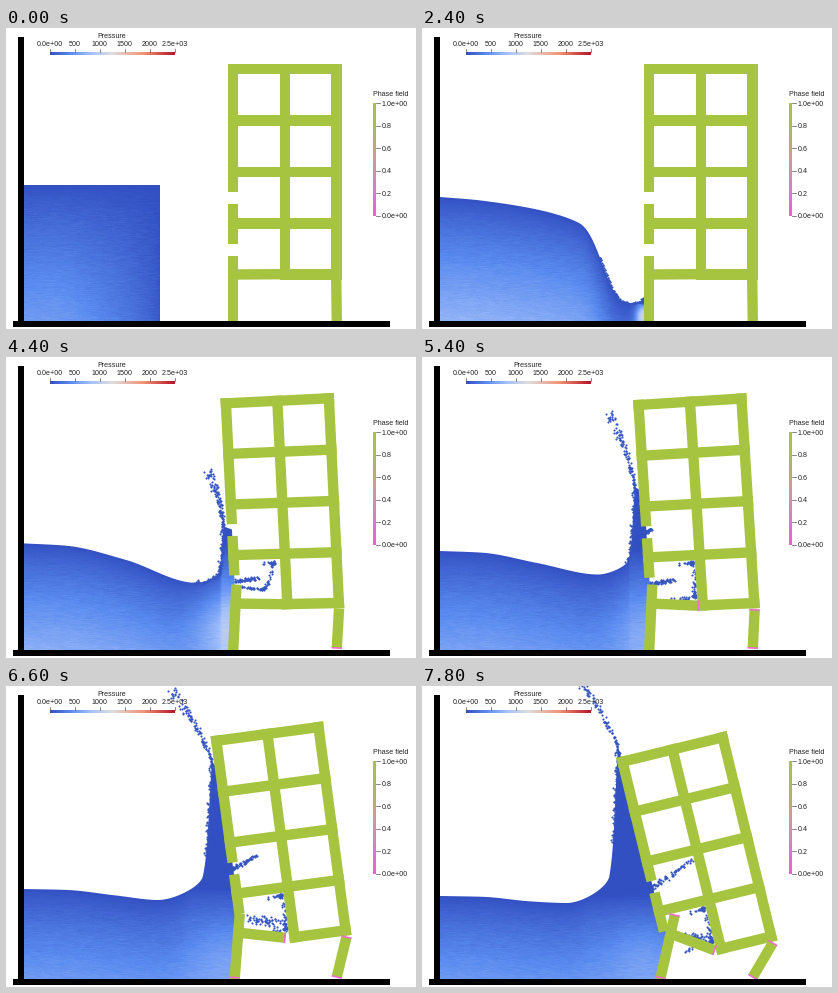
These frames come from a looping animation (410x301 px, 8000 ms). A matplotlib script:

```python
import numpy as np
import matplotlib.pyplot as plt
from matplotlib.animation import FuncAnimation
from matplotlib.collections import LineCollection, PolyCollection
from matplotlib.colors import LinearSegmentedColormap
from matplotlib.patches import Polygon, Rectangle

W, H, DPI = 410, 301, 64
STEP, FRAMES = 200, 40
PX = 72 / DPI
GREEN, PINK, DEEP = "#a6c43f", "#f06ad2", "#3454c0"
HIT = 2400  # the wave reaches the building

pressure_map = LinearSegmentedColormap.from_list("pressure", [
    (0, "#3350c2"), (0.16, "#5a8bef"), (0.33, "#a6c2fa"),
    (0.5, "#dddddd"), (0.75, "#f29476"), (1, "#b81428")])
phase_map = LinearSegmentedColormap.from_list("phase", [
    (0, "#f25be0"), (0.5, "#cb9a9c"), (0.8, "#a9bd4d"), (1, GREEN)])
rng = np.random.default_rng(4)


def ease(a, b, t):
    u = np.clip((t - a) / (b - a), 0, 1)
    return u * u * (3 - 2 * u)


def pchip(t, v, x, start_flat=True):
    """Monotone cubic through the rows of v at positions t."""
    t, v = np.asarray(t, float), np.asarray(v, float)
    x = np.atleast_1d(x)
    h = np.diff(t)[:, None]
    d = np.diff(v, axis=0) / h
    m = np.zeros_like(v)
    same = d[:-1] * d[1:] > 0
    m[1:-1] = np.where(same, 2 * d[:-1] * d[1:] / np.where(same, d[:-1] + d[1:], 1), 0)
    m[-1] = d[-1]
    if not start_flat:
        m[0] = d[0]
    i = np.clip(np.searchsorted(t, x, "right") - 1, 0, len(t) - 2)
    h = h[i]
    u = np.clip((x - t[i])[:, None] / h, 0, 1)
    return ((2 * u**3 - 3 * u**2 + 1) * v[i] + (u**3 - 2 * u**2 + u) * h * m[i]
            + (3 * u**2 - 2 * u**3) * v[i + 1] + (u**3 - u**2) * h * m[i + 1])


def smooth(pts, n=120):
    gaps = np.hypot(*np.diff(pts, axis=0).T) + 1e-3
    s = np.concatenate([[0], np.cumsum(gaps)])
    return pchip(s, pts, np.linspace(0, s[-1], n), start_flat=False)


# ---- building ---------------------------------------------------------
CORNER = np.array([335.5, 36])
THICK = 10.4
# time: top right corner x, y, tilt, flex of lower floors, left leg angle
POSE = {0: (335.5, 36, 0, .7, 0), HIT: (335.5, 36, 0, .7, 0),
        3600: (330.4, 35.8, 2.2, .7, 3), 5400: (324.3, 36, 3.6, .3, 2.7),
        6600: (317, 35.3, 7.6, 0, 4.5), 7800: (304.5, 45, 13.7, 0, 12.7)}

LEVELS = 36 + 51.4 * np.arange(4)
BOXES = [(222, y, 335.5, y + THICK) for y in LEVELS]
BOXES += [(273.5, 241, 335.5, 251.5), (273.5, 36, 283.9, 251.5),
          (325.1, 36, 335.5, 251.5), (222, 36, 232.4, 164), (222, 176, 232.4, 216)]


def pose(t):
    return pchip(list(POSE), list(POSE.values()), t)[0]


def carry(t, pts):
    """Move points of the standing building to where they are at time t."""
    cx, cy, deg, flex, _ = pose(t)
    c, s = np.cos(np.radians(deg)), np.sin(np.radians(deg))
    x, y = (np.asarray(pts, float) - CORNER).T
    sink = -x * s * (1 - flex * np.clip(y / 215, 0, 1))
    return np.c_[cx + x * c + y * s, cy + sink + y * c]


def left_leg(t):
    foot = np.array([227.2 + 11 * np.clip((t - 5400) / 2400, 0, 1) ** 3, 293.5])
    a = np.radians(pose(t)[4])
    up = np.array([np.sin(a), -np.cos(a)])
    return foot, foot + 47 * up, foot + 66 * up


def bar(a, b):
    d = (b - a) / np.hypot(*(b - a))
    n = np.array([-d[1], d[0]]) * THICK / 2
    return np.array([a + n, b + n, b - n, a - n])


def building(t):
    polys = [carry(t, [(x0, y0), (x1, y0), (x1, y1), (x0, y1)])
             for x0, y0, x1, y1 in BOXES]
    foot, knee, head = left_leg(t)
    aim = carry(t, [(272, 246.2)])[0] - knee
    far = knee + aim / np.hypot(*aim) * (51 - 4 * ease(3600, 5400, t))
    top = carry(t, [(330.2, 251 + 2 * ease(3600, 5400, t))])[0]
    base = np.array([330.8, 294 - 3 * ease(2800, 3600, t)])
    left, slab, right = bar(foot, head), bar(knee, far), bar(top, base)
    cracks = [(3400, right[1:3]), (4600, right[[0, 3]]), (4600, slab[1:3]),
              (6000, left[[0, 3]] - (0, 2)), (7000, left[1:3])]
    return polys + [left, slab, right], [seg for begin, seg in cracks if t >= begin]


# ---- water body -------------------------------------------------------
# time: height at the wall, shoulder, trough, tip
WAVE = {0: (157, 154, 157, 154, 250, 154, 293),
        1600: (163, 153, 174, 168, 257, 193, 292),
        HIT: (169, 157, 195, 206, 275, 222, 271),
        3600: (180, 125, 200, 198, 237, 220, 203),
        5400: (194, 115, 206, 176, 217.5, 213, 130),
        6600: (203, 110, 209.5, 152, 214, 206, 75),
        7800: (210, 110, 215.5, 145, 217, 196, 60)}


def surface(t):
    y, *rest = pchip(list(WAVE), list(WAVE.values()), t)[0]
    shoulder, trough, tip = np.reshape(rest, (3, 2))
    a = np.interp(t, [1600, HIT], [.4, .83])
    bend = trough + (tip - trough) * (a, 1 - a)
    start = (18, y), (60, y + .14 * (shoulder[1] - y))
    return smooth(np.vstack([*start, shoulder, trough, bend, tip]))


def outline(t, line):
    """Close the surface along the floor, or behind the wall it leans on."""
    tip = line[-1]
    if tip[0] < 221:
        back = [(tip[0], 294)]
    else:
        back = []
    if t >= HIT:
        foot, knee, _ = left_leg(t)
        wall = carry(t, [(227, max(tip[1], 36)), (227, 214)])
        back = [p for p in wall if p[1] >= tip[1] - 2] + [knee, foot]
    return np.vstack([line, *back, (18, 294)])


gx, gy = np.meshgrid(np.arange(18, 250) + .5, np.arange(0, 294) + .5)
grain = rng.normal(0, 1, gx.shape)
grain = sum(np.roll(grain, k, axis=1) for k in range(7)) / 7 * .02


def pressure(t, line):
    x = np.maximum.accumulate(line[:, 0] + np.arange(len(line)) * 1e-4)
    top = np.interp(gx[0], x, np.maximum(line[:, 1], line[0, 1]))
    depth = np.clip(gy - top, 0, None)
    strength = .2 + .1 * np.exp(-((t - 3200) / 2000) ** 2)
    p = strength * (depth / (293 - line[0, 1])) ** .8
    # the free face of the collapsing column carries no pressure
    free = np.clip(1 - t / HIT, 0, 1)
    p *= 1 - free + free * np.clip((line[-1, 0] + 2 - gx) / 100, 0, 1) ** .6
    grow = ease(HIT, 3600, t)
    hit = np.interp(t, [2200, HIT, 3600, 5200], [0, .4, .26, .06])
    p += hit * np.exp(-((gx - 221) / (7 + 25 * grow)) ** 2
                      - ((gy - 288 + 20 * grow) / (12 + 26 * grow)) ** 2)
    return p + grain * np.clip(depth / 30, 0, 1)


# ---- spray ------------------------------------------------------------
def swarm(n):
    return np.sort(rng.random(n))[:, None], np.clip(rng.normal(0, 1, (n, 2)), -1.8, 1.8)


crown, lining, film, pool, jet = (swarm(n) for n in (110, 90, 95, 60, 75))
ROOM = smooth(np.array([(255, 204), (271, 203), (271, 236), (242, 240)]))


def along(path, s):
    return path[(s[:, 0] * (len(path) - 1)).astype(int)]


def droplets(t, line):
    if t < HIT:
        return np.empty((0, 2))
    tip = line[-1]
    # crown flung up and back from the wall
    q = (t - HIT) / 5400
    end = np.array([220 - 80 * q**1.5, 272 - 500 * q + 200 * q * q])
    ctrl = (tip + end) / 2 + (4, -6 * q)
    s, off = crown
    s = s ** 1.3
    parts = [(1 - s)**2 * tip + 2 * s * (1 - s) * ctrl + s * s * end
             + off * (.5 + 2.6 * s) * min(1, .3 + 4 * q)]
    # beads on the edge of the standing column
    s, off = lining
    parts.append(along(line[-35:], s) + off * (.3 + ease(HIT, 3600, t)))
    # through the lower opening, round the room, then into a pool
    if t >= 2800:
        s, off = film
        u = ease(0, 1, (t - 2800 - 1000 * s) / 1700)
        parts.append(carry(t, (228, 222) + (along(ROOM, s) - (228, 222)) * u + off * 1.1 * u))
        s, off = pool
        u = ease(2800, 4400, t)
        shot = np.hstack([227 + 24 * s * u, 222 - 3 * s * u])
        rest = np.hstack([240 + 32 * s, 222 + 13 * s])
        fall = ease(5200, 7400, t)
        parts.append(carry(t, shot + (rest - shot) * fall + off * (.9 + 5 * fall * (1 - fall) + fall)))
    # through the upper opening
    if t >= 5000:
        s, off = jet
        g = (t - 5000) / 2800
        s = s ** 1.4
        parts.append(carry(t, np.hstack([225 + 46 * g * s, 170 - 16 * g * s])
                           + off * (.6 + g)))
    return np.vstack(parts)


# ---- stage ------------------------------------------------------------
fig = plt.figure(figsize=(W / DPI, H / DPI), dpi=DPI, facecolor="white")
ax = fig.add_axes([0, 0, 1, 1])
ax.axis("off")

water = ax.imshow(np.zeros(gx.shape), cmap=pressure_map, vmin=0, vmax=1,
                  extent=(18, 250, 294, 0), aspect="auto",
                  interpolation="nearest", zorder=1)
shape = Polygon([(0, 0), (1, 0), (1, 1)], fc="none", ec="none")
ax.add_patch(shape)
drops, = ax.plot([], [], "o", color=DEEP, ms=2.1 * PX, mew=0, zorder=2)
walls = PolyCollection([], facecolors=GREEN, edgecolors="none", zorder=3)
crack_lines = LineCollection([], colors=PINK, linewidths=1.6 * PX, zorder=4)
ax.add_collection(walls, autolim=False)
ax.add_collection(crack_lines, autolim=False)

ax.add_patch(Rectangle((12.3, 9), 5.5, 289, fc="black", lw=0, zorder=5))
ax.add_patch(Rectangle((6.5, 293.3), 377.5, 5.2, fc="black", lw=0, zorder=5))


def label(x, y, text, ha="center"):
    ax.text(x, y, text, ha=ha, va="center_baseline", family="Liberation Sans",
            fontsize=7.1 * PX, color="#222222", zorder=7)


def tick(xs, ys):
    ax.plot(xs, ys, color="#555555", lw=.7 * PX, zorder=7)


ramp = np.linspace(0, 1, 128)
ax.imshow(ramp[None, :], cmap=pressure_map, extent=(43.5, 168.5, 27, 24),
          aspect="auto", zorder=6)
ax.imshow(ramp[::-1, None], cmap=phase_map, extent=(367.3, 370.2, 188, 75),
          aspect="auto", zorder=6)
label(106, 7, "Pressure")
for k, text in enumerate(["0.0e+00", "500", "1000", "1500", "2000", "2.5e+03"]):
    x = 43.5 + 25 * k
    tick([x, x], [21, 24])
    label(x, 16, text)
label(384.5, 66, "Phase field")
for k, text in enumerate(["0.0e+00", "0.2", "0.4", "0.6", "0.8", "1.0e+00"]):
    y = 188 - 22.6 * k
    tick([370, 373.5], [y, y])
    label(376, y, text, "left")

ax.set_xlim(0, W)
ax.set_ylim(H, 0)


def draw(i):
    t = i * STEP
    line = surface(t)
    shape.set_xy(outline(t, line))
    water.set_data(pressure(t, line))
    water.set_clip_path(shape)
    drops.set_data(*droplets(t, line).T)
    polys, cracks = building(t)
    walls.set_verts(polys)
    crack_lines.set_segments(cracks)
    return water, drops, walls, crack_lines


anim = FuncAnimation(fig, draw, frames=FRAMES, interval=STEP,
                     repeat=True, repeat_delay=0, blit=False)
plt.show()
```
